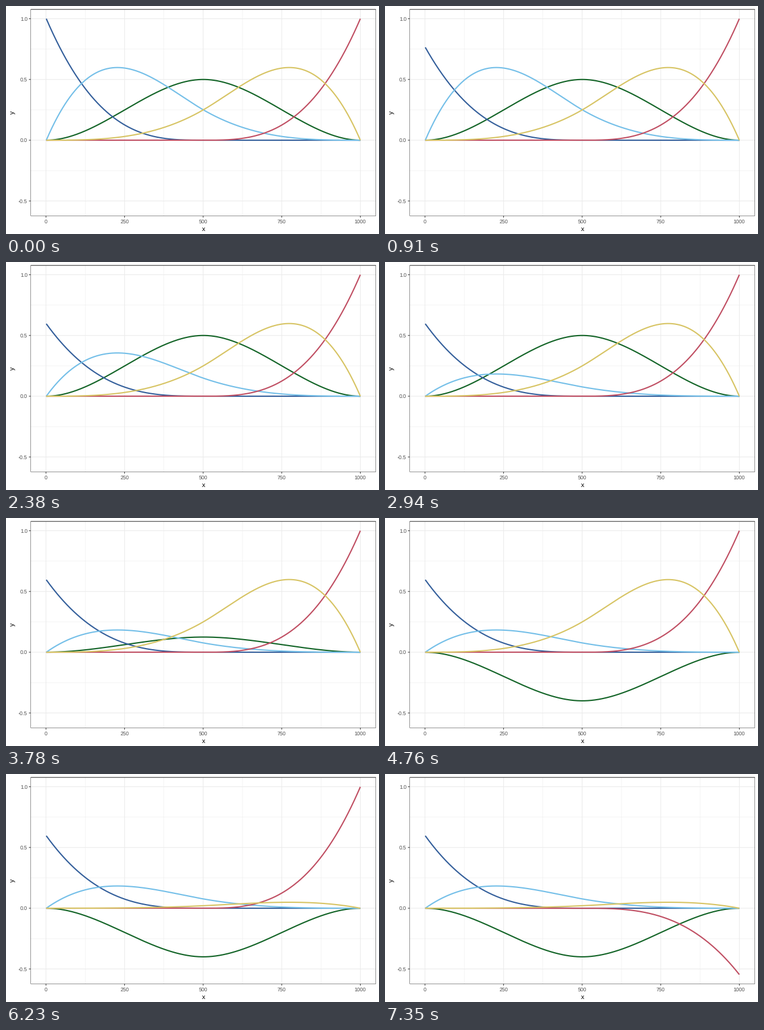
A matplotlib script that plays this animation: 628x384 px, repeating every 7.63 s.

```python
import matplotlib.pyplot as plt
import numpy as np
from matplotlib.animation import FuncAnimation

W, H, DPI = 628, 384, 100
PX = 72 / DPI  # one pixel in points
LEFT, RIGHT, TOP, BOTTOM = 41.4, 623, 5.6, 353.6

FRAMES, INTERVAL = 109, 70
HOLD, MOVE, CYCLE = 4, 17, 21

# Basis order: final weight, colour, stacking
CURVES = [
    (0.596, "#345f9b", 4),
    (0.306, "#74bfe8", 5),
    (-0.8, "#136427", 3),
    (0.082, "#d7c464", 7),
    (-0.546, "#c04f63", 6),
]

plt.rcParams["font.family"] = "Liberation Sans"
plt.rcParams["text.hinting"] = "none"


def cubic_basis(t):
    """Cubic B-splines on [0, 1] with a single inner knot at 0.5."""
    def outer(s):
        return np.maximum(1 - 2 * s, 0) ** 3

    def inner(s):
        return 2 * (1 - s) ** 3 - 2 * outer(s)

    ends = [outer(t), inner(t), inner(1 - t), outer(1 - t)]
    return [*ends[:2], 1 - sum(ends), *ends[2:]]


def cubic_in_out(p):
    return 4 * p ** 3 if p < 0.5 else 1 - 4 * (1 - p) ** 3


def weight(i, frame):
    p = np.clip((frame - HOLD - CYCLE * i) / MOVE, 0, 1)
    return 1 + (CURVES[i][0] - 1) * cubic_in_out(p)


fig = plt.figure(figsize=(W / 100, H / 100), dpi=DPI, facecolor="white")
ax = fig.add_axes([LEFT / W, 1 - BOTTOM / H, (RIGHT - LEFT) / W, (BOTTOM - TOP) / H],
                  zorder=3)
ax.axis("off")

x_lo, x_hi, y_lo, y_hi = 1, 1000, CURVES[4][0], 1
x_pad, y_pad = 0.05 * (x_hi - x_lo), 0.05 * (y_hi - y_lo)
ax.set_xlim(x_lo - x_pad, x_hi + x_pad)
ax.set_ylim(y_lo - y_pad, y_hi + y_pad)


def x_px(x):
    return LEFT + (x - x_lo + x_pad) / (x_hi - x_lo + 2 * x_pad) * (RIGHT - LEFT)


def y_px(y):
    return BOTTOM - (y - y_lo + y_pad) / (y_hi - y_lo + 2 * y_pad) * (BOTTOM - TOP)


def stage_line(xs, ys, color, width, z):
    fig.add_artist(plt.Line2D(
        np.array(xs) / W, 1 - np.array(ys) / H, color=color, lw=width * PX,
        solid_capstyle="butt", solid_joinstyle="miter", snap=False, zorder=z))


def stage_text(x, y, text, size, color, **kw):
    fig.text(x / W, 1 - y / H, text, fontsize=size * PX, color=color,
             **{"ha": "center", "va": "baseline", **kw})


def grid(xs, ys, width, z):
    for x in xs:
        stage_line([x_px(x)] * 2, [TOP, BOTTOM], "#ebebeb", width, z)
    for y in ys:
        stage_line([LEFT, RIGHT], [y_px(y)] * 2, "#ebebeb", width, z)


X_TICKS, Y_TICKS = range(0, 1001, 250), [-0.5, 0, 0.5, 1]
grid(range(125, 1000, 250), [-0.25, 0.25, 0.75], 0.53, 1)
grid(X_TICKS, Y_TICKS, 1.07, 2)

for x in X_TICKS:
    stage_line([x_px(x)] * 2, [BOTTOM, BOTTOM + 2.75], "#333333", 1.07, 2)
    stage_text(x_px(x), 366, str(x), 8.8, "#4d4d4d")
for y in Y_TICKS:
    stage_line([LEFT - 2.75, LEFT], [y_px(y)] * 2, "#333333", 1.07, 2)
    stage_text(36.1, y_px(y) + 3.2, f"{y:.1f}", 8.8, "#4d4d4d", ha="right")

stage_text((LEFT + RIGHT) / 2, 379, "x", 11, "black")
stage_text(6.4, (TOP + BOTTOM) / 2, "y", 11, "black",
           ha="left", va="center", rotation=90)

# Only the inner half of the border stroke shows
BORDER = 0.53
x0, x1 = LEFT + BORDER / 2, RIGHT - BORDER / 2
y0, y1 = TOP + BORDER / 2, BOTTOM - BORDER / 2
stage_line([x0, x1, x1, x0, x0, x1], [y0, y0, y1, y1, y0, y0], "#333333", BORDER, 4)

xs = np.linspace(x_lo, x_hi, 1000)
basis = cubic_basis((xs - x_lo) / (x_hi - x_lo))
lines = [
    ax.plot(xs, b, color=color, lw=2.13 * PX, zorder=z, solid_capstyle="butt")[0]
    for b, (_, color, z) in zip(basis, CURVES)
]


def draw(frame):
    for i, line in enumerate(lines):
        line.set_ydata(basis[i] * weight(i, frame))
    return lines


anim = FuncAnimation(fig, draw, frames=FRAMES, interval=INTERVAL,
                     repeat=True, repeat_delay=0, blit=False)
plt.show()
```
